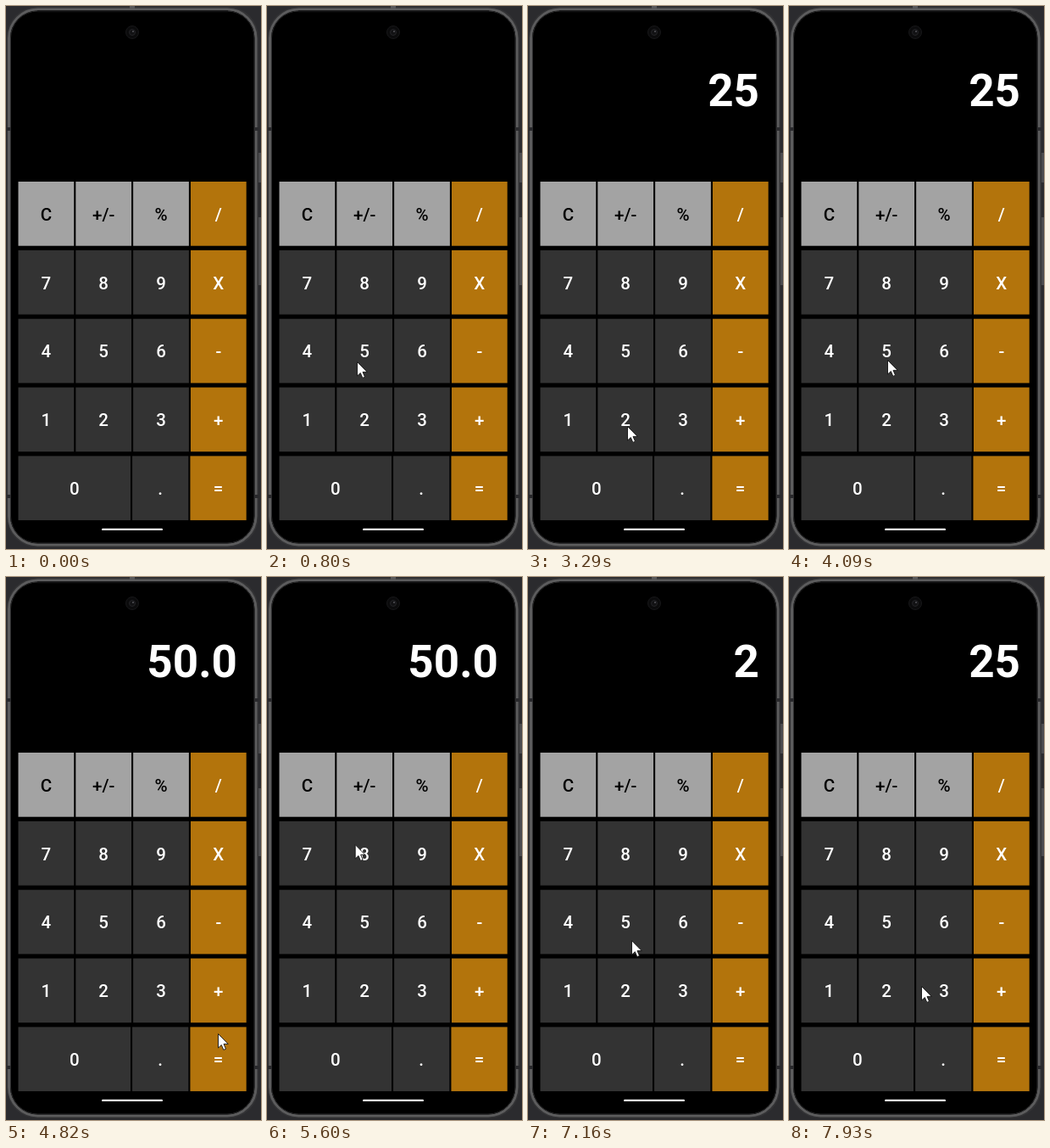
An HTML page that plays this animation: 301x640 px, repeating every 8000 ms.

```html
<!DOCTYPE html>
<html lang="en">
<head>
<meta charset="utf-8">
<title>Calculator</title>
<style>
  html, body { margin: 0; width: 100%; height: 100%; overflow: hidden; background: #2b2b2e; }
  svg { display: block; width: 301px; height: 640px; }
  text { font-family: Roboto, sans-serif; }
  .key { font-size: 20.5px; font-weight: 500; text-anchor: middle; }
  #display { font-size: 53px; font-weight: 700; text-anchor: end; fill: #fff; }
</style>
</head>
<body>
<svg viewBox="0 0 301 640">
  <!-- side buttons and body -->
  <path d="M298 173h3v35h-3zM298 249h3v80h-3z" fill="#4b4b4e"/>
  <rect x="1" y="1" width="297" height="637" rx="36" fill="#333335"/>
  <rect x="3.5" y="4" width="291.5" height="631" rx="34" fill="#000" stroke="#5c5c5d" stroke-width="3"/>
  <rect x="5.5" y="6" width="287.5" height="627" rx="32" fill="#000" stroke="#29292a"/>
  <path d="M1 145h4M1 578h4M294 145h4M294 578h4" stroke="#29292c" stroke-width="4"/>
  <path d="M146 1.5h6" stroke="#58585a" stroke-width="3"/>
  <path d="M37 6.3h225" stroke="#121213" stroke-width="2"/>

  <!-- camera -->
  <circle cx="149" cy="31" r="7.5" fill="#0b0b0c" stroke="#171719"/>
  <circle cx="149" cy="31" r="3.5" fill="#121214" stroke="#232326"/>
  <circle cx="150" cy="30" r="1" fill="#55555a"/>

  <g id="keys"></g>
  <rect x="113" y="615.7" width="72" height="2.4" rx="1.2" fill="#f4f4f4"/>
  <text id="display" x="273" y="117.8"></text>
  <path id="cursor" d="M.5.5V17L4.3 13.5 6.8 19.4 9.5 18.2 7 12.4H12.2Z"
        fill="#fff" stroke="#111" stroke-width=".9" stroke-linejoin="round"/>
</svg>

<script>
const LOOP = 8000, STEP = 140;
const NS = "http://www.w3.org/2000/svg";
const byId = id => document.getElementById(id);
const keys = byId("keys"), display = byId("display"), cursor = byId("cursor");

function add(tag, attrs, label = "") {
  const el = document.createElementNS(NS, tag);
  for (const name in attrs) el.setAttribute(name, attrs[name]);
  el.textContent = label;
  keys.append(el);
}

// Each row shares its width among the keys; a zero takes two shares.
const pad = { x: 14.5, y: 207, width: 269.2, height: 75.7, pitch: 80.85, gap: 2.1 };

function drawRow(line, row) {
  const labels = line.split(" ");
  const share = (pad.width - pad.gap * (labels.length - 1)) / 4;
  const y = pad.y + row * pad.pitch;
  let x = pad.x;
  labels.forEach((label, i) => {
    const width = label === "0" ? share * 2 : share;
    const last = i === labels.length - 1;
    const light = row === 0 && !last;
    const fill = last ? "#b3740c" : light ? "#a3a3a3" : "#333";
    add("rect", { x, y, width, height: pad.height, fill });
    add("text", {
      class: "key", x: x + width / 2, y: y + 45.7, fill: light ? "#000" : "#fff"
    }, label);
    x += width + pad.gap;
  });
}
["C +/- % /", "7 8 9 X", "4 5 6 -", "1 2 3 +", "0 . ="].forEach(drawRow);

// Cursor moves; a key takes effect when the cursor sets off again.
const entry = { x: 126, y: 650 };
const move = (leave, arrive, x, y, key = "") => ({ leave, arrive, x, y, key });
const moves = [
  move(120, 800, 106, 419),
  move(940, 1230, 118, 461, "2"),
  move(1370, 1600, 114, 417, "5"),
  move(1690, 2090, 217, 453),
  move(2090, 2390, 252, 485, "+"),
  move(2650, 3290, 117, 495, "2"),
  move(3430, 3680, 116, 417, "5"),
  move(3970, 4540, 252, 549, "="),
  move(4680, 4820, 250, 538),
  move(4820, 6020, 59, 247, "C"),
  move(6280, 6300, 88, 321),
  move(6300, 6580, 122, 494, "2"),
  move(6890, 7280, 122, 418, "5"),
  move(7410, 7930, 156, 482)
];

// Eased travel, shown in steps of about STEP ms.
function cursorAt(t) {
  let spot = entry;
  for (const { leave, arrive, x, y } of moves) {
    if (t < leave) break;
    const count = Math.max(1, Math.round((arrive - leave) / STEP));
    const part = Math.min(1, (t - leave) / (arrive - leave));
    const p = Math.sin(Math.floor(part * count + 1e-6) / count * Math.PI / 2);
    spot = { x: spot.x + (x - spot.x) * p, y: spot.y + (y - spot.y) * p };
  }
  return spot;
}

function readingAt(t) {
  let shown = "", sum = 0, fresh = false;
  moves.slice(1).forEach(({ leave }, i) => {
    const { key } = moves[i];
    if (t < leave || !key) return;
    if (key === "C") shown = "";
    else if (key === "=") shown = (sum + Number(shown)).toFixed(1);
    else if (key === "+") { sum = Number(shown); fresh = true; }
    else { shown = fresh ? key : shown + key; fresh = false; }
  });
  return shown;
}

function render(t) {
  const { x, y } = cursorAt(t);
  cursor.setAttribute("transform", `translate(${x} ${y})`);
  display.textContent = readingAt(t);
}

const start = performance.now();
function tick() {
  render((performance.now() - start) % LOOP);
  requestAnimationFrame(tick);
}
tick();
</script>
</body>
</html>
```
